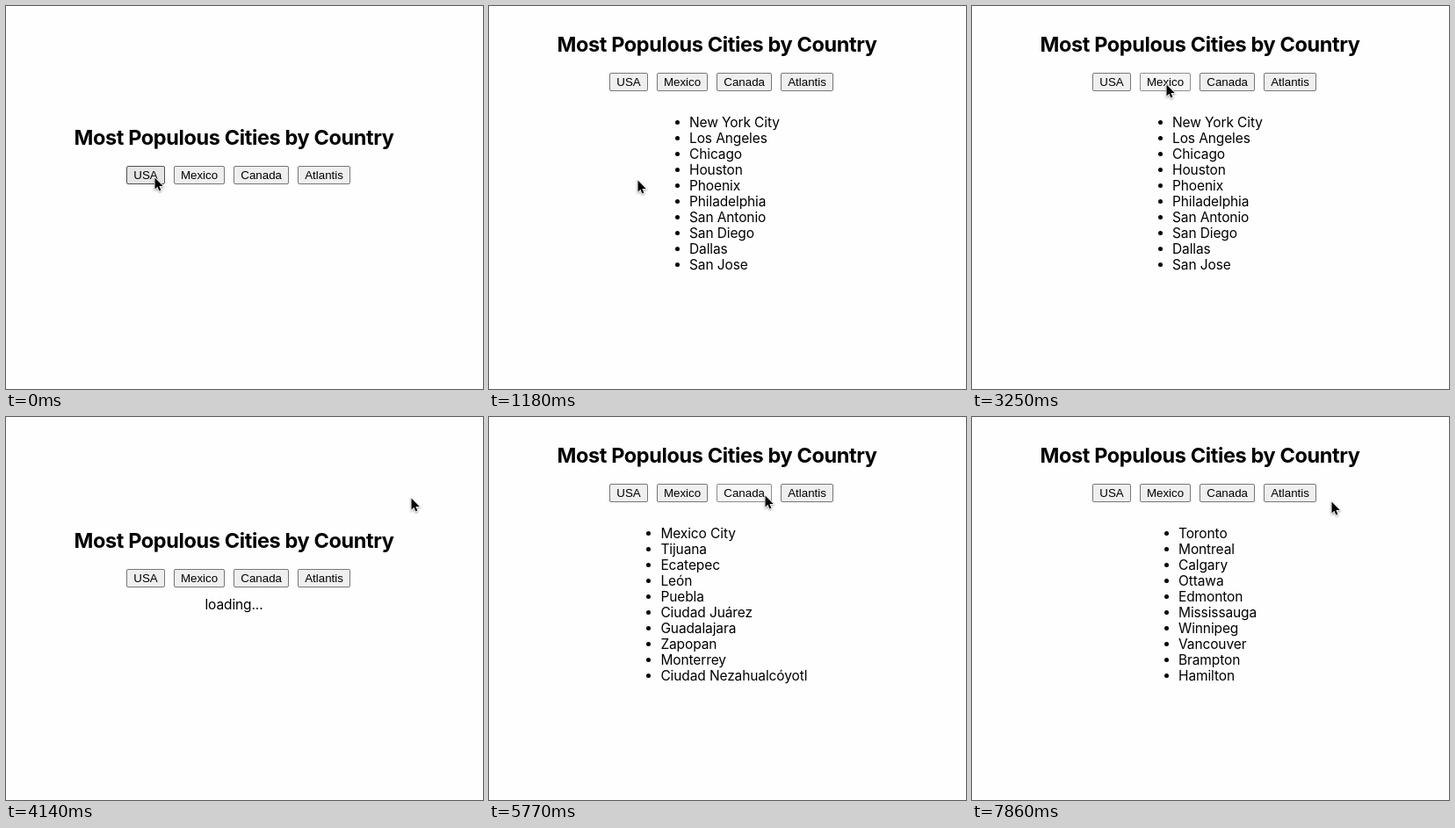
Recreate the animation shown at these times as an HTML page. Size 543 by 436 pixels, loop 8000 ms.

```html
<!DOCTYPE html>
<html lang="en">
<head>
<meta charset="utf-8">
<title>Most Populous Cities by Country</title>
<style>
  html, body { margin: 0; width: 100%; height: 100%; overflow: hidden; background: #fefefe; }
  body { position: relative; font: 15.5px/18px Inter, sans-serif; letter-spacing: -.11px; color: #000; }
  #panel, h2, #buttons, #loading, ul, #cursor { position: absolute; margin: 0; white-space: nowrap; }
  #panel { left: 0; top: 0; width: 519px; }
  h2 { top: 136px; width: 100%; text-align: center; font: bold 23.5px/28px Inter, sans-serif; letter-spacing: -.38px; }
  #buttons { left: 137.2px; top: 182px; display: flex; gap: 10px; }
  .button {
    box-sizing: border-box; height: 21px; padding: 0 7.1px; border: 1px solid #767676; border-radius: 2px;
    background: #efefef; font: 13.333px/19px "Liberation Sans", Arial, sans-serif; letter-spacing: 0;
  }
  .hover { background: #e5e5e5; border-color: #4f4f4f; }
  .active { background: #f5f5f5; border-color: #8d8d8d; }
  #loading { top: 214px; width: 100%; text-align: center; }
  ul { top: 124px; padding: 0; list-style: none; }
  li { position: relative; }
  li::before {
    content: ""; position: absolute; left: -16px; top: 6px;
    width: 5px; height: 5px; border-radius: 50%; background: #000;
  }
  #cursor { left: 0; top: 0; overflow: visible; filter: drop-shadow(0 1px 1px #0006); }
</style>
</head>
<body>
<div id="panel">
  <h2>Most Populous Cities by Country</h2>
  <div id="buttons"></div>
  <div id="loading">loading...</div>
</div>
<ul id="list"></ul>
<svg id="cursor" width="12" height="18">
  <path d="M.5 .4V13.4L3.4 10.7 5.4 15.4 7.4 14.6 5.4 10H9.8Z" stroke="#fff" stroke-width="1.6" paint-order="stroke"/>
</svg>
<script>
const LOOP = 8000, STEP = 148.2, LEAD = 23;
const $ = id => document.getElementById(id);

const countries = [
  { name: 'USA', left: 228, cities: 'New York City,Los Angeles,Chicago,Houston,Phoenix,Philadelphia,San Antonio,San Diego,Dallas,San Jose' },
  { name: 'Mexico', left: 195.4, cities: 'Mexico City,Tijuana,Ecatepec,León,Puebla,Ciudad Juárez,Guadalajara,Zapopan,Monterrey,Ciudad Nezahualcóyotl' },
  { name: 'Canada', left: 235, cities: 'Toronto,Montreal,Calgary,Ottawa,Edmonton,Mississauga,Winnipeg,Vancouver,Brampton,Hamilton' },
  { name: 'Atlantis' }
];

// Each request, in steps: button pressed, loading shown, list shown
const requests = [[1, 2, 6], [22, 23, 30], [39, 42, 49]];

// Pointer stops: step, x, y
const stops = [
  [0, 169, 195], [6, 169, 195], [8, 169, 198], [11, 155, 201], [12, 155, 201],
  [21, 221, 89], [24, 221, 89], [28, 461, 92], [32, 395, 93], [36, 314, 89],
  [43, 314, 89], [46, 503, 117], [51, 503, 117], [53, 409, 96]
];

const buttons = countries.map(({ name }) => {
  const button = document.createElement('div');
  button.className = 'button';
  button.textContent = name;
  $('buttons').append(button);
  return button;
});

function pointerAt(step) {
  const next = stops.findIndex(stop => stop[0] > step);
  if (next < 0) return stops.at(-1).slice(1);
  const [s0, x0, y0] = stops[next - 1], [s1, x1, y1] = stops[next];
  const k = (step - s0) / (s1 - s0), e = k * k * (3 - 2 * k);
  return [x0 + (x1 - x0) * e, y0 + (y1 - y0) * e];
}

function stateAt(step) {
  const state = { view: 'idle', shown: -1, pressed: -1 };
  requests.forEach(([press, load, done], i) => {
    if (step >= press && step < load) state.pressed = i;
    if (step >= load) state.view = 'loading';
    if (step >= done) Object.assign(state, { view: 'list', shown: i });
  });
  return state;
}

let listed = -1;
function showList(index) {
  if (index === listed) return;
  listed = index;
  const { left, cities } = countries[index];
  $('list').style.left = left + 'px';
  $('list').innerHTML = cities.split(',').map(city => `<li>${city}</li>`).join('');
}

function draw(step) {
  const { view, shown, pressed } = stateAt(step);
  const [x, y] = pointerAt(step);
  $('panel').style.top = { idle: 0, loading: -9, list: -106 }[view] + 'px';
  $('loading').hidden = view !== 'loading';
  $('list').hidden = view !== 'list';
  if (view === 'list') showList(shown);
  $('cursor').style.transform = `translate(${x}px, ${y}px)`;
  buttons.forEach((button, i) => {
    const box = button.getBoundingClientRect();
    const over = x >= box.left && x < box.right && y >= box.top && y < box.bottom;
    button.className = 'button' + (i === pressed ? ' active' : over ? ' hover' : '');
  });
}

function tick() {
  draw(Math.floor((performance.now() % LOOP + LEAD) / STEP));
  requestAnimationFrame(tick);
}
tick();
</script>
</body>
</html>
```
